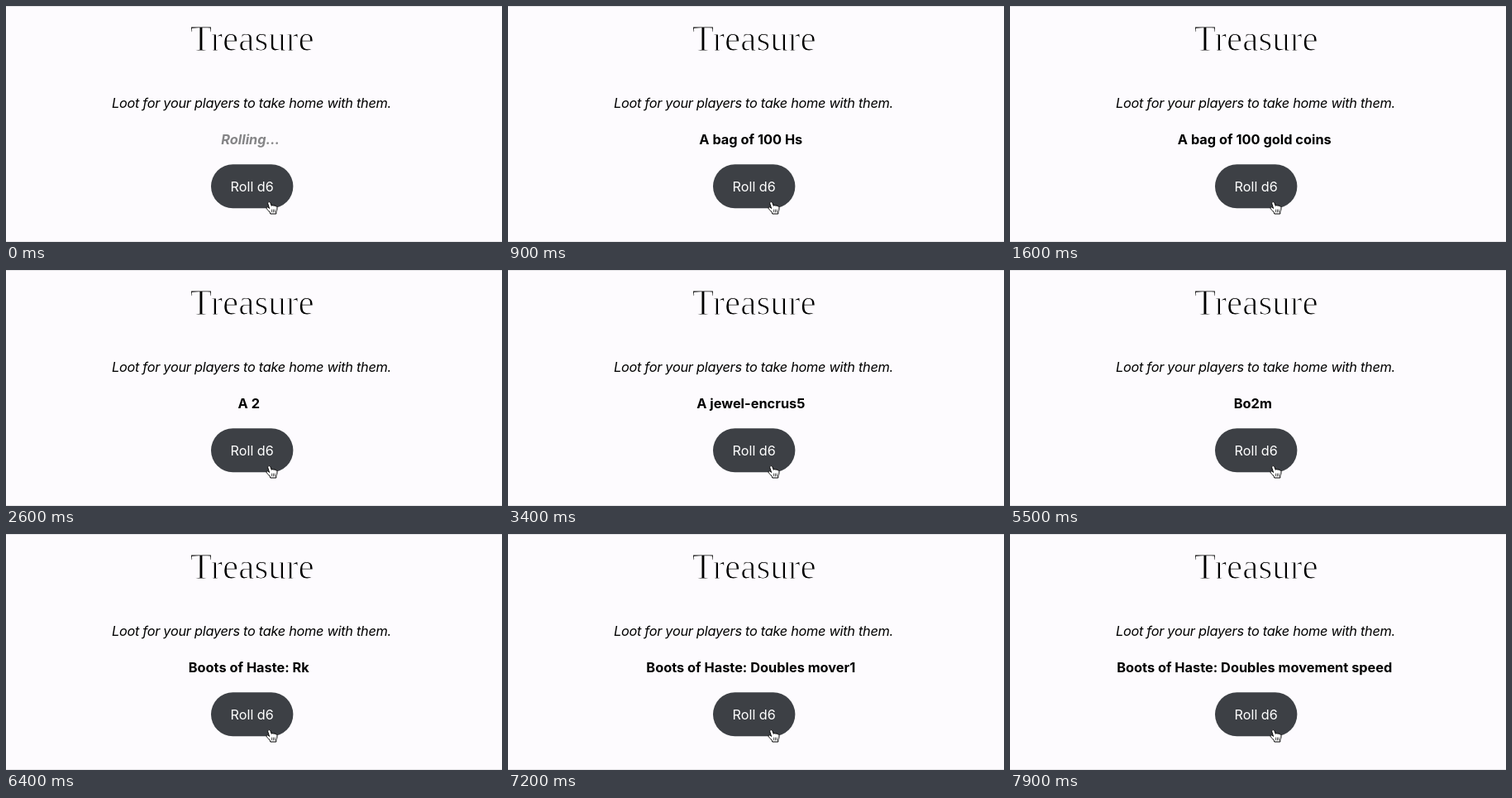
Recreate the animation shown at these times as an HTML page. Size 600x285 px, loop 8000 ms.

```html
<!DOCTYPE html>
<html lang="en">
<head>
<meta charset="utf-8">
<title>Treasure</title>
<style>
  html, body { margin: 0; width: 100%; height: 100%; overflow: hidden; background: #fdfbfe; }
  svg { display: block; }
  text { font: 16.35px Inter, "Open Sans", sans-serif; text-anchor: middle; fill: #000; }
  .title { font: 43.3px "Liberation Serif", serif; stroke: #fdfbfe; stroke-width: 1.2; }
  .intro { font-style: italic; letter-spacing: -.018em; }
  .result { font-weight: 700; }
  .result.rolling { font-style: italic; fill: #858587; }
  .label { font-size: 16.2px; fill: #fff; }
</style>
</head>
<body>
<svg width="600" height="285" viewBox="0 0 600 285">
  <rect width="600" height="285" fill="#fdfbfe"/>
  <path d="M0 .5H600M0 284.5H600" stroke="#e4e3e6"/>
  <text class="title" x="297.7" y="54">Treasure</text>
  <text class="intro" x="297" y="123">Loot for your players to take home with them.</text>
  <text class="result" id="result" y="167"></text>
  <rect x="248" y="191.3" width="99.4" height="53" rx="26.5" fill="#3d4045"/>
  <text class="label" x="297.7" y="224">Roll d6</text>
  <circle id="press" cx="318" cy="235.5" r="30" fill="#808084" fill-opacity=".35"/>
  <g stroke="#000" stroke-linejoin="round" stroke-linecap="round">
    <path fill="#fff" d="M316.7 238.4C316.4 236.4 319.2 235.9 319.9 237.7L321.3 241.3C322.1 240.3 323.4 240.5 323.9 241.4C324.7 240.5 325.9 240.9 326.2 241.9C327.1 241.5 328 242.1 328 243.4C328.1 245.8 327.6 247.2 326.8 248.8V251H319.8L319.3 249.2C318 247.4 316.6 246.2 315.2 244.8C314.4 243.4 316 242.2 317.2 243.2L318.3 244.2Z"/>
    <path fill="none" stroke-width=".7" d="M321.6 246v2.8M323.5 246v2.8M325.3 246v2.8"/>
  </g>
</svg>
<script>
const LOOP = 8000, TICK = 100;
const NOISE = "q7Zb2mXe9TfaL4vKc0Hs5wRkyD3nJu8PgEi6Vtr1oMx4CzFd9Wh2Ub";

// Each roll shows a placeholder at `reset`, then types its text from `start` to `end`.
const rolls = [
  { reset: 0, start: 1, end: 1555, tail: 2, text: "A bag of 100 gold coins" },
  { reset: 2300, start: 2390, end: 4033, tail: 1, text: "A jewel-encrusted crown" },
  { reset: 5200, start: 5301, end: 7868, tail: 2, text: "Boots of Haste: Doubles movement speed" }
];
const presses = [[2100, 2300], [5000, 5200]];

const result = document.getElementById("result");
const press = document.getElementById("press");

function show(text, x, rolling = false) {
  result.textContent = text;
  result.setAttribute("x", x);
  result.classList.toggle("rolling", rolling);
}

function draw(time) {
  const t = Math.floor(time / TICK) * TICK;
  const { start, end, tail, text } = rolls.findLast(roll => t >= roll.reset);
  const typed = Math.floor(text.length * (t - start) / (end - start));

  if (t < start) {
    show("Rolling...", 295.6, true);
  } else if (typed >= text.length) {
    show(text, 295.8);
  } else {
    const step = Math.round((t - start) / TICK);
    const count = Math.min(tail, text.length - typed);
    show(text.slice(0, typed) + NOISE.substr(step * 2, count), 293.8);
  }
  const pressed = presses.some(([from, to]) => t >= from && t < to);
  press.setAttribute("visibility", pressed ? "visible" : "hidden");
}

const origin = performance.now();
function frame() {
  draw((performance.now() - origin) % LOOP);
  requestAnimationFrame(frame);
}
frame();
</script>
</body>
</html>
```
